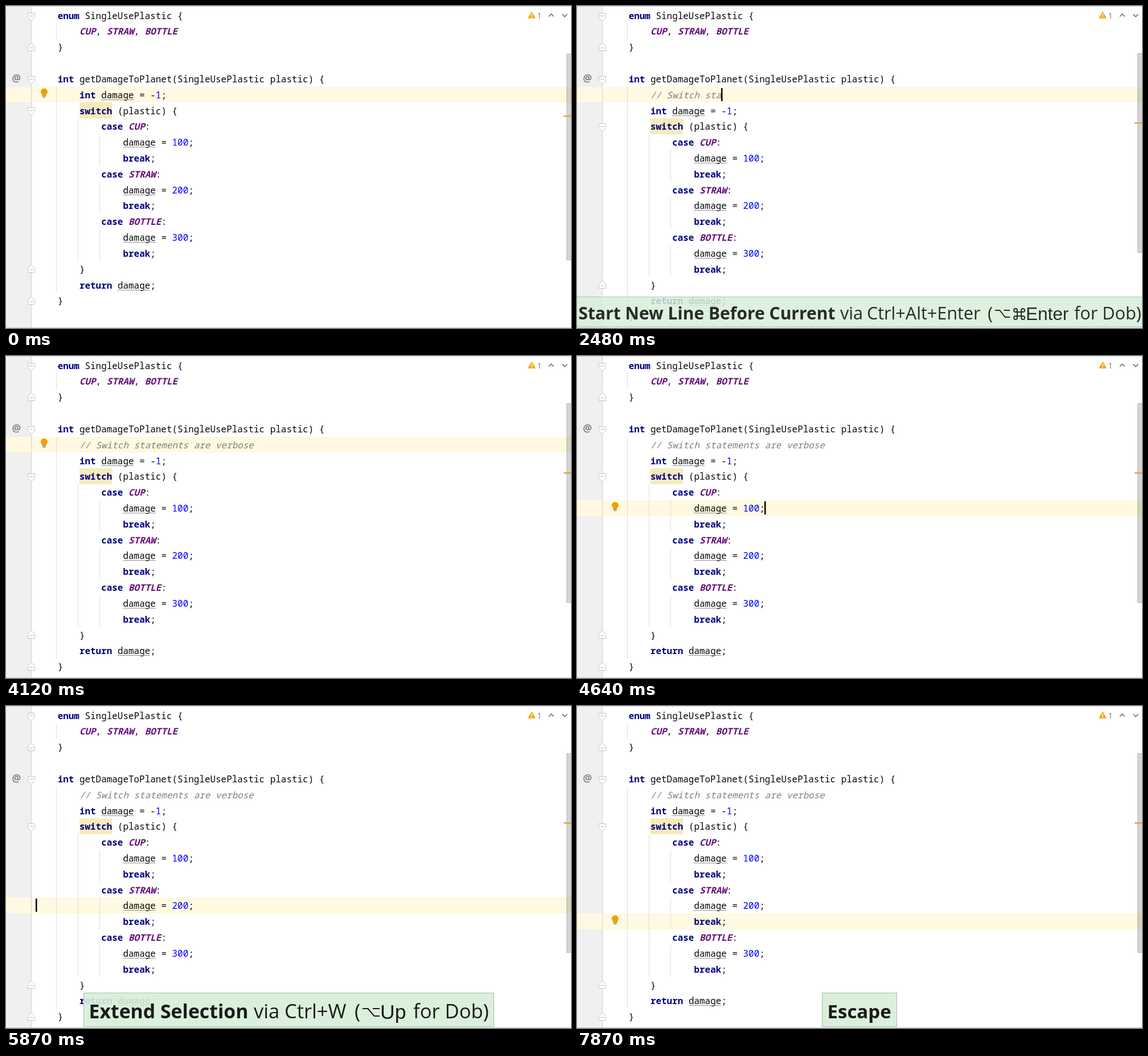
Write an HTML page with a canvas that moves like this. It is 992 px wide and 565 px high and loops after 8 s.

```html
<!DOCTYPE html>
<html lang="en">
<head>
<meta charset="utf-8">
<title>Editor</title>
<style>
  html, body { margin: 0; width: 100%; height: 100%; overflow: hidden; background: #fff; }
  canvas { display: block; width: 992px; height: 565px; }
</style>
</head>
<body>
<canvas id="stage"></canvas>
<script>
const W = 992, H = 565, LOOP = 8000;
const X0 = 52.4, CW = 9.565, TOP = 3, ROW = 27.82;
const MONO = '15.95px "Noto Sans Mono", "DejaVu Sans Mono", monospace';
const SANS = '"Open Sans", "Noto Sans", sans-serif';
const COMMENT = '// Switch statements are verbose';
const COMMENT_ROW = 5;

const CODE = `    enum SingleUsePlastic {
        CUP, STRAW, BOTTLE
    }

    int getDamageToPlanet(SingleUsePlastic plastic) {
        int damage = -1;
        switch (plastic) {
            case CUP:
                damage = 100;
                break;
            case STRAW:
                damage = 200;
                break;
            case BOTTLE:
                damage = 300;
                break;
        }
        return damage;
    }`.split('\n');

const TOKEN = /\/\/.*|\w+|[^\s\w]+/g;
const STYLES = [
  [/^\/\//, 'italic 500', '#808080'],
  [/^(enum|int|switch|case|break|return)$/, 'bold', '#000080'],
  [/^(CUP|STRAW|BOTTLE)$/, 'italic bold', '#660e7a'],
  [/^\d+$/, '500', '#0000ff'],
  [/./, '500', '#080808']
];

const FOLDS = [[0, 1], [2, -1], [4, 1], [6, 1], [16, -1], [18, -1]];
const GUIDES = [[4, 1, 1], [4, 5, 17], [8, 7, 15], [12, 8, 9], [12, 11, 12], [12, 14, 15]];

// Editor states: time, row, caret column (null when hidden), bulb, whole-row selection
const CURSOR = [
  [0, 5, null, 1, 0], [480, 5, 8, 1, 0], [970, 5, null, 1, 0], [1310, 5, 8, 0, 0],
  [3950, 5, 40, 1, 0], [4120, 5, null, 1, 0],
  [4250, 6, 24, 0, 0], [4350, 7, 26, 0, 0], [4510, 8, 21, 0, 0], [4640, 9, 29, 1, 0],
  [4900, 9, 0, 0, 1], [5250, 9, 0, 0, 0], [5330, 10, 0, 0, 0],
  [5810, 11, 0, 0, 0], [5870, 12, 0, 0, 0], [6070, 12, null, 0, 0],
  [6240, 12, 0, 0, 1], [6730, 12, null, 1, 1], [6890, 12, 0, 1, 1],
  [7380, 12, null, 1, 0], [7710, 13, 0, 0, 0], [7870, 13, null, 1, 0]
];

const canvas = document.getElementById('stage');
const ctx = canvas.getContext('2d');
const dpr = window.devicePixelRatio || 1;
canvas.width = W * dpr;
canvas.height = H * dpr;

const colX = col => X0 + col * CW;
const rowY = row => TOP + row * ROW;
const clamp = (v, lo, hi) => Math.min(hi, Math.max(lo, v));

function rect(x, y, w, h, color) {
  ctx.fillStyle = color;
  ctx.fillRect(x, y, w, h);
}

function rowRect(x, row, w, color) {
  const y = Math.floor(rowY(row));
  rect(x, y, w, Math.floor(rowY(row + 1)) - y, color);
}

function text(str, x, y, font, color) {
  ctx.font = font;
  ctx.fillStyle = color;
  ctx.fillText(str, x, y);
}

function path(points, color, width, fill, close) {
  ctx.beginPath();
  points.forEach(([x, y]) => ctx.lineTo(x, y));
  if (close) ctx.closePath();
  if (fill) { ctx.fillStyle = fill; ctx.fill(); }
  ctx.strokeStyle = color;
  ctx.lineWidth = width;
  ctx.stroke();
}

function codeLine(line, row) {
  const y = Math.round(rowY(row) + 19.6);
  for (const { 0: word, index } of line.matchAll(TOKEN)) {
    const [, style, color] = STYLES.find(([test]) => test.test(word));
    text(word, colX(index), y, `${style} ${MONO}`, color);
    if (word === 'damage') rect(colX(index), y + 2, 6 * CW, 1, '#8f8f8f');
  }
}

function fold(row, dir) {
  const y = Math.round(rowY(row) + (dir > 0 ? 15.5 : 14)) - 0.5;
  const x = 44.5;
  const body = [[-6, -6], [6, -6], [6, 2], [0, 7.5], [-6, 2]];
  path(body.map(([dx, dy]) => [x + dx, y + dy * dir]), '#c3c3c3', 1, '#fff', true);
  path([[x - 3, y - dir], [x + 3, y - dir]], '#b4b4b4', 1);
}

function bulb(row) {
  const y = rowY(row) + 10;
  ctx.fillStyle = '#eda200';
  ctx.beginPath();
  ctx.arc(67, y - 1.5, 6, Math.PI * 0.75, Math.PI * 0.25);
  ctx.lineTo(69.8, y + 4.5);
  ctx.lineTo(64.2, y + 4.5);
  ctx.fill();
  rect(63.5, y + 4.6, 7, 1.4, '#7c7c7c');
  rect(64.5, y + 7, 5, 1.4, '#7c7c7c');
}

function inspections() {
  ctx.lineJoin = 'round';
  path([[923, 11], [928.8, 21], [917.2, 21]], '#ebab16', 1.5, '#ebab16', true);
  ctx.lineJoin = 'miter';
  rect(922.2, 13.5, 1.6, 4.2, '#fff');
  rect(922.2, 18.8, 1.6, 1.6, '#fff');
  text('1', 932.5, 22, `14px ${SANS}`, '#777');
  path([[953, 18.5], [957.3, 14], [961.6, 18.5]], '#6e6e6e', 1.6);
  path([[976.6, 14.3], [981, 18.8], [985.4, 14.3]], '#6e6e6e', 1.6);
}

function scrollbar(inserted) {
  const [y, end, mark] = inserted ? [83, 433, 204] : [84, 446, 192];
  rect(984, y, 8, end - y, 'rgba(0, 0, 0, 0.17)');
  ctx.strokeStyle = 'rgba(0, 0, 0, 0.13)';
  ctx.lineWidth = 1;
  ctx.strokeRect(984.5, y + 0.5, 9, end - y - 1);
  rect(979, mark, 13, 2.5, '#e0aa2a');
}

function optionKey(x, y, w, h) {
  path([[x, y], [x + w * 0.32, y], [x + w * 0.68, y + h], [x + w, y + h]], '#1a1a1a', 2);
  path([[x + w * 0.6, y], [x + w, y]], '#1a1a1a', 2);
}

function commandKey(x, y) {
  const s = 3.5, r = 3;
  ctx.strokeStyle = '#1a1a1a';
  ctx.lineWidth = 2;
  ctx.strokeRect(x - s, y - s, 2 * s, 2 * s);
  for (const sx of [-1, 1]) for (const sy of [-1, 1]) {
    ctx.beginPath();
    ctx.arc(x + sx * (s + r), y + sy * (s + r), r, 0, Math.PI * 2);
    ctx.stroke();
  }
}

function banner(x, y, w, h, alpha, label) {
  if (alpha <= 0) return;
  ctx.save();
  ctx.globalAlpha = alpha * 0.9;
  rect(x, y, w, h, '#d8efd9');
  ctx.globalAlpha = alpha;
  ctx.strokeStyle = '#a9bdaa';
  ctx.lineWidth = 1;
  ctx.strokeRect(x + 0.5, y + 0.5, w - 1, h - 1);
  label();
  ctx.restore();
}

function caption(size, y, bold, boldX, parts, keyName, keyX) {
  const ink = '#1a1a1a';
  text(bold, boldX, y, `bold ${size}px ${SANS}`, ink);
  for (const [str, x] of parts) text(str, x, y, `${size * 1.02}px ${SANS}`, ink);
  if (keyName) text(keyName, keyX, y + 1, `${size * 1.05}px "Liberation Sans", sans-serif`, ink);
}

function newLineBanner(t) {
  const alpha = Math.min(clamp((t - 1280) / 150, 0, 1), clamp((2620 - t) / 150, 0, 1));
  banner(-1, 510, 994, 53, alpha, () => {
    caption(30, 550, 'Start New Line Before Current', 2.5,
      [['via', 462], ['Ctrl+Alt+Enter', 509], ['(', 721], ['for Dob)', 873]], 'Enter', 788);
    optionKey(734, 534, 26, 12);
    commandKey(776.5, 540.5);
  });
}

function extendBanner(t) {
  const alpha = t < 7380 ? clamp((t - 4870) / 190, 0, 1) : 0;
  banner(136, 503, 721, 60, alpha, () => {
    caption(33.8, 548, 'Extend Selection', 145.5,
      [['via', 435], ['Ctrl+W', 489], ['(', 612], ['for Dob)', 715]], 'Up', 657);
    optionKey(626, 531, 30, 13);
  });
}

function escapeBanner(t) {
  banner(430, 503, 132, 60, t >= 7380 ? 1 : 0, () => caption(33, 548, 'Escape', 439.5, []));
}

function draw(t) {
  const inserted = t >= 1310;
  const shift = row => row + (inserted && row >= COMMENT_ROW ? 1 : 0);
  const typed = clamp(Math.floor((t - 1640) / 70) + 1, 0, COMMENT.length);
  const state = CURSOR.findLast(([time]) => time <= t);
  const [, row, col, hasBulb, selected] = state;

  ctx.setTransform(dpr, 0, 0, dpr, 0, 0);
  rect(0, 0, W, H, '#fff');
  rect(0, 0, 44, H, '#f0f0f0');
  rowRect(0, row, W, '#fef9e0');
  if (selected) rowRect(colX(0), row, W, '#a6d2ff');
  rect(44, 0, 1, H, '#d2d2d2');
  rowRect(colX(8), shift(6), 6 * CW, '#f6ebbc');

  for (const [c, from, to] of GUIDES) {
    const first = from === COMMENT_ROW ? from : shift(from);
    const y = Math.floor(rowY(first));
    rect(Math.round(colX(c) - 2.8), y, 1, Math.floor(rowY(shift(to) + 1)) - y, '#dedede');
  }
  FOLDS.forEach(([r, dir]) => fold(shift(r), dir));
  text('@', 10.5, 133, `600 17.5px ${SANS}`, '#6e6e6e');

  CODE.forEach((line, i) => codeLine(line, shift(i)));
  if (typed) codeLine(' '.repeat(8) + COMMENT.slice(0, typed), COMMENT_ROW);
  if (hasBulb) bulb(row);
  if (col !== null) {
    const caretCol = inserted && t < 3950 ? 8 + typed : col;
    rect(Math.round(colX(caretCol) - 0.6), Math.floor(rowY(row)) + 2, 2.5, 23, '#000');
  }

  inspections();
  scrollbar(inserted);
  rect(0, 0, W, 1, '#d0d0d0');
  rect(0, 564, W, 1, '#c8c8c8');
  newLineBanner(t);
  extendBanner(t);
  escapeBanner(t);
}

const start = performance.now();
function frame() {
  draw((performance.now() - start) % LOOP);
  requestAnimationFrame(frame);
}
frame();
</script>
</body>
</html>
```
